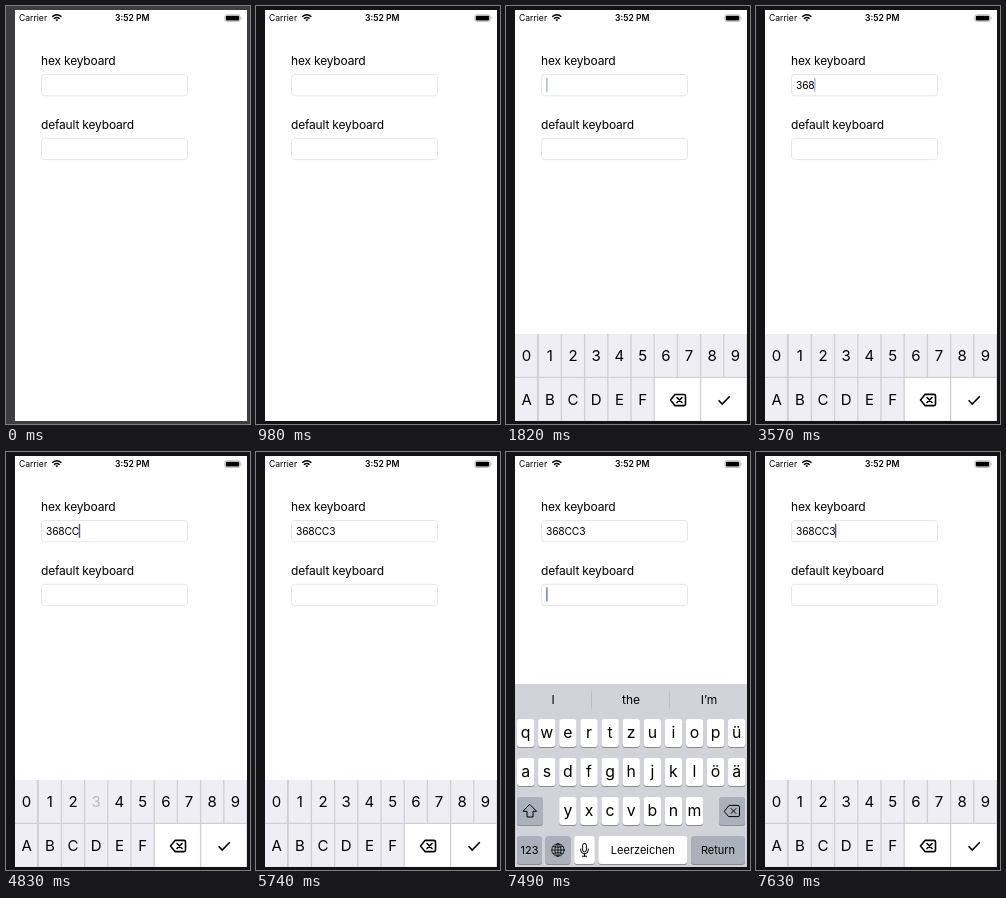
An HTML page that plays this animation: 244x418 px, repeating every 8 s.

```html
<!DOCTYPE html>
<html lang="en">
<head>
<meta charset="utf-8">
<title>Hex keyboard</title>
<style>
  html, body { margin: 0; width: 100%; height: 100%; overflow: hidden; }
  svg { display: block; width: 100vw; height: 100vh; font-family: Inter, sans-serif; }
  .label { font-size: 12px; letter-spacing: -.18px; }
  .value { font-size: 10.3px; letter-spacing: -.2px; white-space: pre; }
  .field { fill: #fff; stroke: #e4e4e6; stroke-width: .9; }
  .caret { fill: #4657b4; }
  .status { font-size: 8.6px; }
  .key { text-anchor: middle; font-size: 15px; }
  .letter { font-size: 15.8px; }
  .word { font-size: 11px; }
  .hint { font-size: 12px; }
  .line { fill: none; stroke: #000; stroke-width: 1; stroke-linecap: round; stroke-linejoin: round; }
  .bold { stroke-width: 1.6; }
</style>
</head>
<body>
<svg viewBox="0 0 244 418">
  <defs>
    <clipPath id="screen"><rect x="9" y="4" width="232" height="411"/></clipPath>
    <g id="erase">
      <path d="M-7.5 0L-3 -5.6H6Q7.5 -5.6 7.5 -4V4Q7.5 5.6 6 5.6H-3Z"/>
      <path d="M-1 -2.5L4 2.5M4 -2.5L-1 2.5"/>
    </g>
  </defs>
  <rect id="desk" width="244" height="418"/>
  <g clip-path="url(#screen)">
    <rect x="9" y="4" width="232" height="411" fill="#fff"/>

    <text class="status" x="13" y="15">Carrier</text>
    <g class="line" style="stroke-width:1.5;stroke-linecap:butt">
      <path d="M46.2 10.7Q50.8 6.8 55.4 10.7M48 12.7Q50.8 10.3 53.6 12.7"/>
      <path d="M50.8 15.3L49.3 13.7Q50.8 12.6 52.3 13.7Z" fill="#000" stroke="none"/>
    </g>
    <text class="status" x="126.3" y="15" text-anchor="middle" font-weight="600">3:52 PM</text>
    <rect x="218.8" y="8.7" width="15.4" height="6.8" rx="1.8" fill="none" stroke="#999" stroke-width=".6"/>
    <rect x="219.8" y="9.7" width="13.4" height="4.8" rx="1"/>
    <path d="M235.1 10.8Q236.3 12.1 235.1 13.4Z" fill="#999"/>

    <text class="label" x="35" y="59.3">hex keyboard</text>
    <rect class="field" x="35.5" y="68.5" width="146" height="21.3" rx="3.2"/>
    <text class="label" x="35" y="123">default keyboard</text>
    <rect class="field" x="35.5" y="132.3" width="146" height="21.3" rx="3.2"/>
    <text class="value" id="value" x="40" y="82.7"></text>
    <rect class="caret" id="caret" width="1.4" height="14"/>

    <g id="hexPad"></g>
    <g id="letterPad"></g>
  </g>
</svg>
<script>
const LOOP = 8000, STEP = 70;
const FOCUS = 980, OPEN = 1190, SWITCH = 5950, BACK = 7630;
const PAD_HEIGHT = 87, FADE = 330;

const presses = [
  { key: '3', down: 2030, up: 2170 },
  { key: '6', down: 2380, up: 2520 },
  { key: '8', down: 2800, up: 2940 },
  { key: 'C', down: 3920, up: 3920 },
  { key: 'C', down: 4410, up: 4410 },
  { key: '3', down: 4830, up: 4970 }
];

const $ = id => document.getElementById(id);
const clamp = v => Math.min(1, Math.max(0, v));
const rect = (x, y, w, h, fill, r = 0) =>
  `<rect x="${x}" y="${y}" width="${w}" height="${h}" rx="${r}" fill="${fill}"/>`;
const text = (label, x, y, cls = '') => `<text class="key ${cls}" x="${x}" y="${y}">${label}</text>`;

function buildHexPad() {
  const pitch = 23.2, top = 328, gap = 1.3;
  const cell = (col, row, span, fill) =>
    rect(9 + col * pitch + (col ? gap / 2 : 0), top + row * 44, span * pitch - gap, 42.8, fill);
  let out = rect(9, top, 232, PAD_HEIGHT + 1, '#cfcfd4');
  ['0123456789', 'ABCDEF'].forEach((keys, row) => [...keys].forEach((key, col) => {
    out += cell(col, row, 1, '#efeef5');
    out += `<g data-key="${key}">${text(key, 9 + (col + .5) * pitch, 355.1 + row * 44)}</g>`;
  }));
  out += cell(6, 1, 2, '#fff') + cell(8, 1, 2, '#fff');
  out += '<use href="#erase" class="line bold" transform="translate(172 394)"/>';
  out += '<path class="line bold" style="stroke-linecap:butt;stroke-linejoin:miter" d="M212.6 394.3L216.2 398L223.8 390.2"/>';
  $('hexPad').innerHTML = out;
}

function buildLetterPad() {
  const pitch = 21.1, gray = '#abb0ba';
  const cap = (x, y, w, fill = '#fff') => rect(x, y + 1, w, 28, '#898b90', 3) + rect(x, y, w, 28, fill, 3);
  let out = rect(9, 232, 232, 183, '#d1d3d9');

  [['I', 47], ['the', 125], ['I’m', 203]].forEach(([word, x]) => out += text(word, x, 251.5, 'hint'));
  out += rect(85.2, 239.5, .8, 17, '#b4b7be') + rect(163.3, 239.5, .8, 17, '#b4b7be');

  [['qwertzuiopü', 11, 267], ['asdfghjklöä', 11, 306], ['yxcvbnm', 53.2, 345]].forEach(([keys, left, y]) =>
    [...keys].forEach((key, i) => {
      const x = left + i * pitch;
      out += cap(x, y, 17.4) + text(key, x + 8.7, y + 19.2, 'letter');
    }));

  out += cap(11, 345, 26, gray) + cap(213, 345, 26, gray);
  out += '<path class="line" d="M24 352.6L30.6 359.3H27V365H21V359.3H17.4Z"/>';
  out += '<use href="#erase" class="line" transform="translate(226 359)"/>';

  out += cap(11, 384, 25, gray) + text('123', 23.5, 402.3, 'word');
  out += cap(39.5, 384, 25, gray);
  out += `<g class="line" style="stroke-width:.8" transform="translate(52 398)">
    <circle r="6.2"/><ellipse rx="3" ry="6.2"/>
    <path d="M0 -6.2V6.2M-6.2 0H6.2M-5 -3.4Q0 -1.8 5 -3.4M-5 3.4Q0 1.8 5 3.4"/></g>`;
  out += cap(68.2, 384, 20.6);
  out += `<g class="line" transform="translate(78.5 398)">
    <rect x="-1.9" y="-6.6" width="3.8" height="8.4" rx="1.9"/>
    <path d="M-3.8 -1V0A3.8 3.8 0 0 0 3.8 0V-1M0 3.8V6.2M-2.2 6.2H2.2"/></g>`;
  out += cap(92.3, 384, 89) + text('Leerzeichen', 136.8, 402, 'word');
  out += cap(185, 384, 54, gray) + text('Return', 212, 402, 'word');
  $('letterPad').innerHTML = out;
}

// A key dims while held and fades back after release.
function keyOpacity(key, t) {
  return presses.reduce((o, p) => {
    if (p.key !== key || t < p.down) return o;
    return Math.min(o, .22 + .78 * clamp((t - p.up) / FADE));
  }, 1);
}

function caretOpacity(age) {
  const period = 980, phase = age % period;
  const fadeIn = age < period ? 1 : clamp((phase - 20) / 100);
  return Math.min(fadeIn, 1 - clamp((phase - 520) / 200));
}

function draw(t) {
  const second = t >= SWITCH && t < BACK;
  const opened = t >= OPEN;
  const typed = presses.filter(p => t >= p.up);
  const resets = [OPEN, ...presses.map(p => p.up), SWITCH, BACK];
  const lastReset = Math.max(0, ...resets.filter(r => r <= t));

  $('desk').setAttribute('fill', t < FOCUS ? '#3d3d3f' : '#131316');
  $('value').textContent = typed.map(p => p.key).join('');

  const caret = $('caret');
  const width = second || !typed.length ? 0 : $('value').getComputedTextLength() - .6;
  caret.setAttribute('x', 40.2 + width);
  caret.setAttribute('y', second ? 135.4 : 71.8);
  caret.setAttribute('opacity', opened ? caretOpacity(t - lastReset) : 0);

  // Critically damped slide from below the screen.
  const k = .015 * Math.max(0, t - 1130);
  $('hexPad').setAttribute('transform', `translate(0 ${PAD_HEIGHT * (1 + k) * Math.exp(-k)})`);
  $('hexPad').setAttribute('display', opened && !second ? 'inline' : 'none');
  $('letterPad').setAttribute('display', second ? 'inline' : 'none');
  hexKeys.forEach(el => el.setAttribute('opacity', keyOpacity(el.dataset.key, t)));
}

buildHexPad();
buildLetterPad();
const hexKeys = [...document.querySelectorAll('[data-key]')];
const start = performance.now();

function tick() {
  const t = (performance.now() - start) % LOOP;
  draw(Math.floor(t / STEP) * STEP);
  requestAnimationFrame(tick);
}
tick();
</script>
</body>
</html>
```
